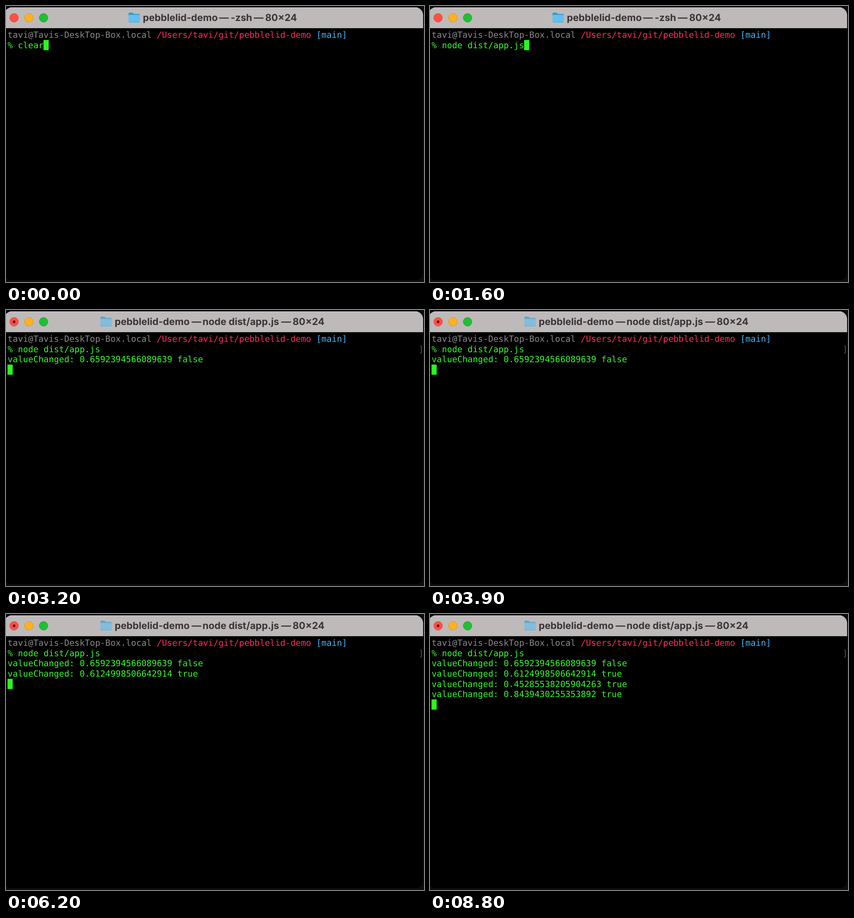
Animation of 921x608 px, one loop 8.9 s. Source, as an HTML page:

```html
<!DOCTYPE html>
<html lang="en">
<head>
<meta charset="utf-8">
<title>Terminal</title>
<style>
  html, body { margin: 0; width: 100%; height: 100%; overflow: hidden; background: #0d0c12; }
  svg { display: block; width: 921px; height: 608px; }
  text { white-space: pre; text-rendering: geometricPrecision; }
  .title { font: 700 21.3px Inter, sans-serif; fill: #383436; }
  .term { font: 18.83px "DejaVu Sans Mono", monospace; fill: #35f82b; }
  .host { fill: #8a8a8a; }
  .path { fill: #fb2e5c; }
  .branch { fill: #48b4f4; }
  .mark { fill: #45613c; }
</style>
</head>
<body>
<svg viewBox="0 0 921 608">
  <defs>
    <clipPath id="window"><rect x="-4" y="3" width="923" height="601" rx="17"/></clipPath>
    <g id="folder">
      <path d="M0 16V3q0-2 2-2h7l3 3h11q2 0 2 2v10z" fill="#2f9bd0"/>
      <rect y="6" width="25" height="17" rx="2" fill="#62c1f1"/>
      <path d="M1 21.5h23" stroke="#43a5d8"/>
    </g>
  </defs>

  <g clip-path="url(#window)">
    <rect x="-4" width="923" height="608"/>
    <rect x="-4" y="3" width="923" height="46" fill="#bebaba"/>
    <path d="M-4 3.5H919" stroke="#cecaca"/>
    <path d="M-4 48.5H919" stroke="#a5a2a2"/>
  </g>

  <g stroke-width="1">
    <circle cx="17.8" cy="26" r="9.5" fill="#fd5046" stroke="#df4139"/>
    <circle cx="50.3" cy="26" r="9.5" fill="#fbb123" stroke="#dc991f"/>
    <circle cx="82.8" cy="26" r="9.5" fill="#20bf35" stroke="#1ba52c"/>
  </g>

  <g id="idle" class="title">
    <use href="#folder" x="270" y="13.5"/>
    <text x="301.5" y="32.5">pebblelid-demo</text>
    <text x="469.5" y="32.5">—</text>
    <text x="495" y="32.5">-zsh</text>
    <text x="546" y="32.5">—</text>
    <text x="571" y="32.5">80×24</text>
  </g>

  <g id="running" class="title">
    <circle cx="17.8" cy="26" r="3" fill="#5c0705"/>
    <use href="#folder" x="208" y="13.5" opacity=".65"/>
    <text x="239.5" y="32.5">pebblelid-demo</text>
    <text x="409" y="32.5">—</text>
    <text x="433" y="32.5">node dist/app.js</text>
    <text x="606.5" y="32.5">—</text>
    <text x="631.5" y="32.5">80×24</text>
    <g class="term">
      <text class="mark" x="-7.5" y="92.7">[</text>
      <text class="mark" x="909" y="92.7">]</text>
    </g>
  </g>

  <g class="term">
    <text x="3.5" y="70"><tspan class="host">tavi@Tavis-DeskTop-Box.local </tspan><tspan class="path">/Users/tavi/git/pebblelid-demo </tspan><tspan class="branch">[main]</tspan></text>
    <text id="command" x="3.5" y="92.7"></text>
    <g id="output"></g>
  </g>
  <rect id="cursor" width="11.4" height="22.4" fill="#28fb1e"/>
</svg>
<script>
  const LOOP = 8900, START = 2000, COLUMN = 11.335, ROW = 22.67;
  const commands = [[0, "clear"], [100, ""], [700, "clear"], [1100, "node dist/app.js"]];
  const values = [
    [3100, "0.6592394566089639 false"],
    [5200, "0.6124998506642914 true"],
    [6300, "0.45285538205904263 true"],
    [7300, "0.8439430255353892 true"]
  ];
  const $ = id => document.getElementById(id);
  const show = (node, on) => node.setAttribute("visibility", on ? "visible" : "hidden");

  const lines = values.map(([, value], i) => {
    const line = document.createElementNS("http://www.w3.org/2000/svg", "text");
    line.setAttribute("x", 3.5);
    line.setAttribute("y", 70 + (i + 2) * ROW);
    line.textContent = "valueChanged: " + value;
    return $("output").appendChild(line);
  });

  function draw(now) {
    const time = now % LOOP;
    const running = time >= START;
    const command = "% " + commands.filter(([at]) => at <= time).pop()[1];
    const printed = values.filter(([at]) => at <= time).length;

    show($("idle"), !running);
    show($("running"), running);
    $("command").textContent = command;
    lines.forEach((line, i) => show(line, i < printed));

    const column = running ? 0 : command.length;
    const row = running ? 2 + printed : 1;
    $("cursor").setAttribute("x", 3.3 + column * COLUMN);
    $("cursor").setAttribute("y", 52.2 + row * ROW);
  }

  function tick() {
    draw(performance.now());
    requestAnimationFrame(tick);
  }
  tick();
</script>
</body>
</html>
```
